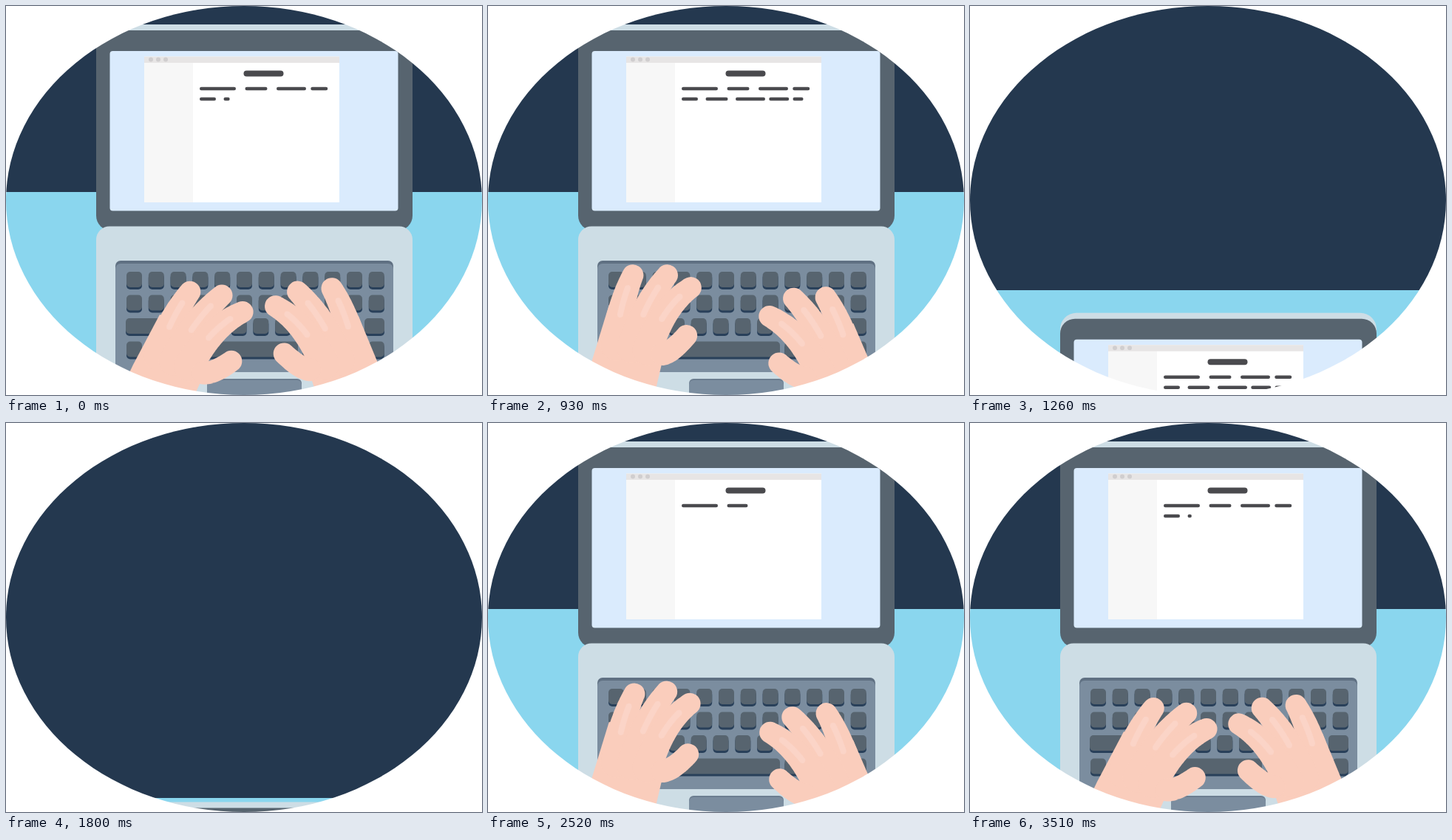
Write an HTML page with a canvas that moves like this. It is 644x527 px and loops after 3.54 s.

```html
<!DOCTYPE html>
<html lang="en">
<head>
<meta charset="utf-8">
<title>Typing on a laptop</title>
<style>
  html, body { margin: 0; width: 100%; height: 100%; overflow: hidden; background: #fff; }
  canvas { display: block; clip-path: ellipse(50% 50%); }
</style>
</head>
<body>
<canvas id="stage" width="644" height="527"></canvas>
<script>
const ctx = document.getElementById('stage').getContext('2d');
const LOOP = 3540, STEP = 30;
const GREY = '#57646f', SILVER = '#cddde5', STEEL = '#7b8d9f', INK = '#4a4a4e';
const SKIN = '#facdbc', SHINE = '#fbd4c7';

// Word lengths per line of text; the gap halves after the second word
const ROWS = [
  { y: 112, gap: 12.5, words: [49, 30, 40, 23] },
  { y: 126, gap: 10.5, words: [22, 30, 40, 27, 19] }
];

const lerp = (a, b, s) => a + (b - a) * s;
const clamp = x => Math.max(0, Math.min(1, x));
const smooth = (a, b, t) => { const x = clamp((t - a) / (b - a)); return x * x * (3 - 2 * x); };

// Accelerates down out of view from 1000 ms, then decelerates back up until `end`
function drop(t, outRate, inRate, end) {
  return t < 1600
    ? outRate * Math.max(0, t - 1000) ** 2
    : inRate * Math.max(0, end - t) ** 2;
}

function box(x, y, w, h, color, radius = 0) {
  ctx.fillStyle = color;
  ctx.beginPath();
  ctx.roundRect(x, y, w, h, radius);
  ctx.fill();
}

const dash = (x, y, length, weight) => box(x, y - weight / 2, length, weight, INK, weight / 2);

function key(x, y, w = 21) {
  box(x, y + 3, w, 21, '#29405a', 5);
  box(x, y, w, 21, GREY, 5);
}

function drawText(t) {
  dash(321.5, 91.5, 54, 8);
  const now = t < 1600 ? t + LOOP : t;
  let count = 0;
  for (const { y, gap, words } of ROWS) {
    let x = 262;
    words.forEach((length, i) => {
      const start = 2070 + 285 * count;
      // The first word is already on the page
      const typed = count++ ? smooth(start, start + 200, now) : 1;
      if (typed > 0) dash(x, y, lerp(5, length, typed), 4.6);
      x += length + (i < 2 ? gap : gap / 2);
    });
  }
}

function drawLaptop(t) {
  box(122, 25, 428, 100, SILVER, 22);
  box(122, 33, 428, 271, GREY, 20);
  box(140.5, 61, 390, 216.5, '#daebfd', 4);
  box(187, 68.5, 264, 197.5, '#fff');
  box(187, 77, 66, 189, '#f7f7f7');
  box(187, 68.5, 264, 8.5, '#e7e5e5');
  for (let i = 0; i < 3; i++) box(193 + 10 * i, 69.5, 6, 6, '#d0cecf', 3);
  drawText(t);

  box(122, 298.5, 428, 300, SILVER, 18);
  box(148, 345, 376, 151, '#5f7082', 7);
  box(148, 349, 376, 147, STEEL, 7);
  for (let i = 0; i < 12; i++) {
    const x = 163 + 29.8 * i;
    key(x, 360);
    key(x, 391.5);
    if (i > 1 && i < 11) key(x - 7.5, 423);
    if (i < 3 || i > 7) key(x, 454.5);
  }
  key(162, 423, 46);
  key(485, 423, 27);
  key(253, 454.5, 142);
  box(272, 505, 128, 60, '#6c7e90', 6);
  box(272, 507, 128, 60, STEEL, 6);
}

// Fingertips with the curl of each finger, measured from the outer tip; thumb last
const TIPS = [[0, 0, 8], [44, 6, 12], [73, 30, 18], [56, 94, -10]];
const PALM = new Path2D('M-40 32L-76 100L-112 175H-8L14 126L24 100L0 50Z');

// A chain of discs along a curve from the tip to its knuckle
function drawFinger([x, y, curl], i, from, to, color, radius, growth) {
  const rootX = -42 + 20 * i, rootY = 90 + 7 * i;
  const bendX = (x + rootX) / 2 - 6, bendY = (y + rootY) / 2 - curl;
  ctx.fillStyle = color;
  ctx.beginPath();
  for (let s = from; s <= to; s += 0.02) {
    const px = lerp(lerp(x, bendX, s), lerp(bendX, rootX, s), s);
    const py = lerp(lerp(y, bendY, s), lerp(bendY, rootY, s), s);
    const r = radius + growth * s;
    ctx.moveTo(px + r, py);
    ctx.arc(px, py, r, 0, 7);
  }
  ctx.fill();
}

function drawHand(x, y, angle, mirror, t) {
  ctx.save();
  ctx.translate(x, y);
  ctx.scale(mirror, 1);
  ctx.rotate(angle);
  ctx.fillStyle = SKIN;
  ctx.fill(PALM);
  const tips = TIPS.map(([tipX, tipY, curl], i) => {
    const tap = Math.sin(t / LOOP * 2 * Math.PI * 14 + mirror + i * 2.1);
    return [tipX + tap, tipY + tap * 1.6, curl];
  });
  tips.forEach((tip, i) => drawFinger(tip, i, 0, 1, SKIN, 14.5, i < 3 ? 6 : 1));
  tips.slice(0, 3).forEach((tip, i) => drawFinger(tip, i, 0.2, 0.6, SHINE, 4, 0));
  ctx.restore();
}

function draw(t) {
  box(0, 0, 644, 527, '#24384f');
  box(0, 252 + drop(t, 0.001967, 0.001754, 2182), 644, 527, '#8ad6ee');

  ctx.save();
  ctx.translate(0, drop(t, 0.00578, 0.00285, 2214));
  drawLaptop(t);
  ctx.restore();

  // The hands glide apart and back together along the keyboard
  const apart = smooth(200, 800, t) - smooth(2600, 3300, t) + (t > 2600 ? 0 : 0);
  ctx.save();
  ctx.translate(0, drop(t, 0.00578, 0.00285, 2187));
  drawHand(lerp(248, 197, apart), lerp(386, 366, apart), -0.19 * apart, 1, t);
  drawHand(lerp(440, 457, apart), lerp(384, 395, apart), lerp(-0.096, -0.08, apart), -1, t);
  ctx.restore();
}

function frame() {
  draw(Math.floor(performance.now() % LOOP / STEP) * STEP);
  requestAnimationFrame(frame);
}
frame();
</script>
</body>
</html>
```
